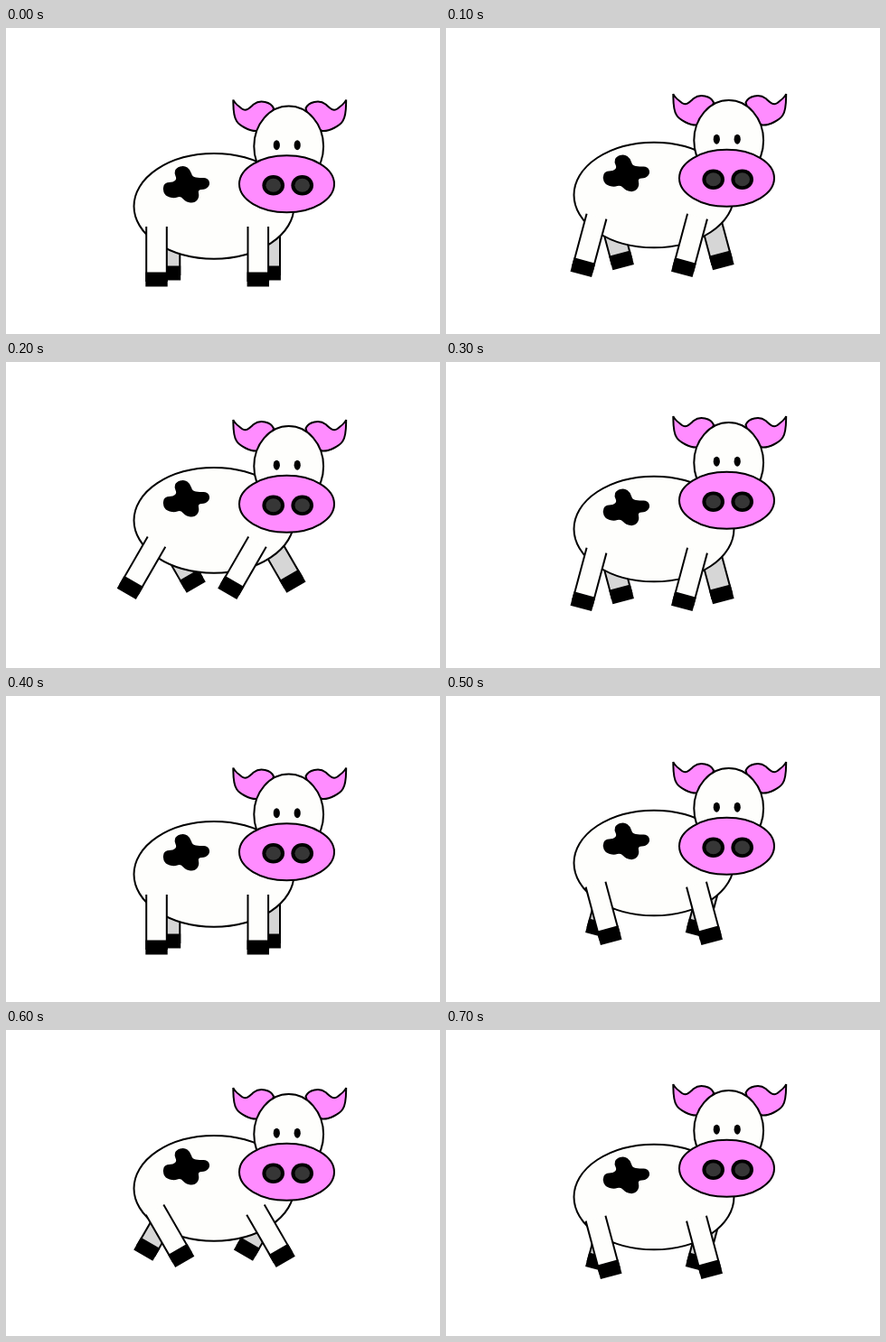
Recreate the animation shown at these times as an HTML page. Size 480 by 339 pixels, loop 0.8 s.

```html
<!DOCTYPE html>
<html lang="en">
<head>
<meta charset="utf-8">
<title>Walking cow</title>
<style>
  html, body { margin: 0; width: 100%; height: 100%; overflow: hidden; background: #fff; }
  svg { display: block; width: 100vw; height: 100vh; }
  .line { stroke: #000; stroke-width: 2; }
  .skin { fill: #fefefc; }
  .pink { fill: #ff8cff; }
</style>
</head>
<body>
<svg viewBox="0 0 480 339">
  <defs>
    <g id="leg">
      <path d="M-11.3 0V60H11.3V0"/>
      <path d="M-12.2 50.5H12.2V66.5H-12.2Z" fill="#000" stroke="none"/>
    </g>
    <path id="ear" class="pink line" d="M251.3 79.5C253 84 257 86 261 89.5C266 93 270 88 274 84.5C281 79 293 82 296 89L290 108L278 114C270 115 258 108 255 103C251 97 251.500 88 251.300 79.500Z"/>
    <g id="nostril">
      <ellipse rx="12.3" ry="11.3"/>
      <ellipse rx="8.3" ry="7.5" fill="#363636"/>
    </g>
  </defs>
  <g class="line" fill="#d6d6d6">
    <use id="farBack" href="#leg"/>
    <use id="farFront" href="#leg"/>
  </g>
  <g id="body">
    <ellipse class="skin line" cx="230" cy="197.400" rx="88.500" ry="58.300"/>
    <path id="spot"/>
  </g>
  <g class="skin line">
    <use id="nearBack" href="#leg"/>
    <use id="nearFront" href="#leg"/>
  </g>
  <g id="head">
    <use href="#ear"/>
    <use href="#ear" transform="translate(627.5) scale(-1 1)"/>
    <ellipse class="skin line" cx="312.700" cy="131" rx="38.400" ry="44.500"/>
    <ellipse cx="299.300" cy="129.700" rx="3.600" ry="5.500"/>
    <ellipse cx="322.200" cy="129.700" rx="3.600" ry="5.500"/>
    <ellipse class="pink line" cx="310.500" cy="172.800" rx="52.500" ry="31.500"/>
    <use href="#nostril" x="295.700" y="174.200"/>
    <use href="#nostril" x="327.700" y="174.200"/>
  </g>
</svg>
<script>
const el = id => document.getElementById(id);
const STEP = 100;
const swing = [0, 1, 2, 1, 0, -1, -2, -1]; // leg angle in units of 15 degrees
const bodyLift = [0, 12.4, 22];            // by size of swing
const headLift = [0, 6.5, 15.5, 19.5];     // twice per loop

// Closed curve through the midpoints of a polygon
function smooth(points) {
  const mid = (a, b) => `${(a[0] + b[0]) / 2} ${(a[1] + b[1]) / 2}`;
  const n = points.length;
  let d = "M" + mid(points[n - 1], points[0]);
  points.forEach((p, i) => { d += `Q${p[0]} ${p[1]} ${mid(p, points[(i + 1) % n])}`; });
  return d + "Z";
}

el("spot").setAttribute("d", smooth([
  [188, 155], [197, 152], [204, 157], [206, 165], [214, 166], [223, 166], [226, 173],
  [221, 179], [212, 179], [214, 187], [209, 194], [199, 193], [193, 186], [186, 189],
  [176, 186], [173, 178], [176, 171], [185, 171], [189, 167], [186, 161]
]));

const move = (id, x, y, angle = 0) =>
  el(id).setAttribute("transform", `translate(${x} ${y}) rotate(${angle})`);

function draw(time) {
  const step = Math.floor(time / STEP) % swing.length;
  const s = swing[step], size = Math.abs(s);
  const lift = bodyLift[size], angle = s * 15;
  const nearY = 220 - [0, 11.3, 20.8][size];
  const drift = s < 0 ? s : 0;

  move("body", 0, -lift);
  move("head", 0, -headLift[step % 4]);
  move("farBack", 181, 213 - lift, 0);
  for (const [id, x] of [["farBack", 181], ["farFront", 291.7]]) {
    el(id).setAttribute("transform", `translate(${x} ${221 - lift}) rotate(${-angle}) translate(0 -8)`);
  }
  move("nearBack", 166.5 + drift, nearY, angle);
  move("nearFront", 278.8 + drift - (size ? 0.8 : 0), nearY, angle);
}

function tick(now) {
  draw(now);
  requestAnimationFrame(tick);
}
draw(0);
requestAnimationFrame(tick);
</script>
</body>
</html>
```
